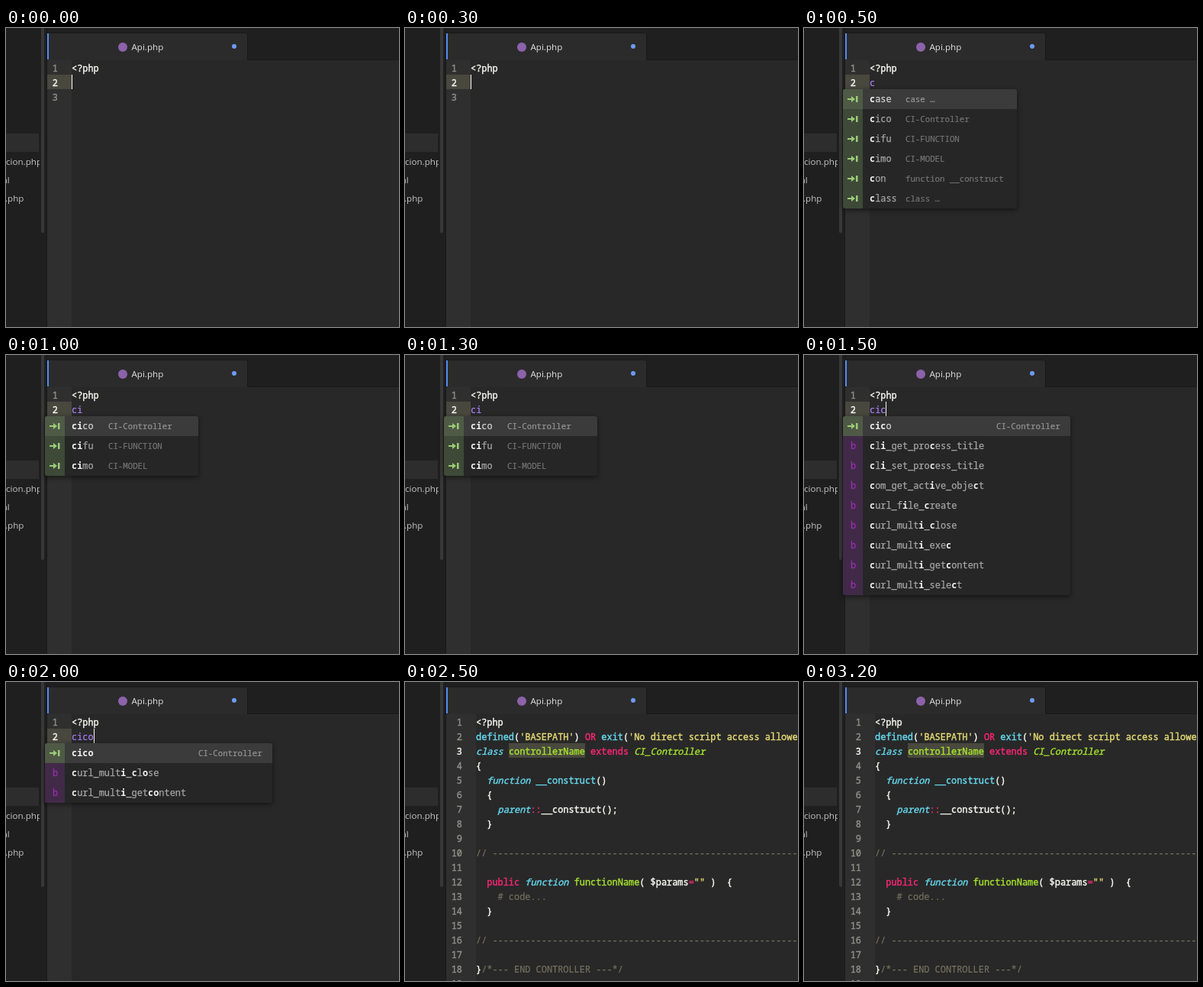
An HTML page for the animation above (3.67 s loop, 515 px wide and 391 px high).

```html
<!DOCTYPE html>
<html lang="en">
<head>
<meta charset="utf-8">
<title>Snippet completion</title>
<style>
html, body { margin: 0; width: 100%; height: 100%; overflow: hidden; background: #282828; }
svg { display: block; }
text { white-space: pre; }
.ui { font: 11.6px "Open Sans", "Noto Sans", sans-serif; fill: #c4c4c4; }
.tab { fill: #e2e2e2; }
.code {
  font: 500 11.915px "Noto Sans Mono", "DejaVu Sans Mono", monospace;
  color: #f8f8f2; fill: currentColor; stroke: currentColor; stroke-width: .4px;
}
.item { color: #a6a6a6; stroke-width: .25px; }
.hit { font-weight: 700; color: #f0f0f0; stroke-width: 0; }
.label { font-size: 10.72px; color: #757575; stroke-width: .2px; }
.item.on { color: #d0d0d0; }
.label.on { color: #969696; }
.num { color: #90908a; text-anchor: end; }
.cur { color: #f8f8f2; }
.k { color: #66d9ef; font-style: italic; }
.f { color: #66d9ef; }
.r { color: #f92672; }
.g { color: #a6e22e; }
.i { color: #a6e22e; font-style: italic; }
.s { color: #e6db74; }
.c { color: #75715e; stroke-width: .2px; }
.v { color: #ae81ff; stroke-width: .2px; }
.b { color: #962fae; stroke-width: .3px; }
.popup { filter: drop-shadow(0 2px 3px #0008); }
</style>
</head>
<body>
<svg id="stage" width="515" height="391" viewBox="0 0 515 391"></svg>
<script>
const LINE = 19, TOP = 42, ROW = 26, CHAR = 7.149;
const rect = (x, y, w, h, fill, more = '') =>
  `<rect x="${x}" y="${y}" width="${w}" height="${h}" fill="${fill}" ${more}/>`;
const text = (x, y, cls, body) => `<text x="${x}" y="${y}" class="${cls}">${body}</text>`;
const span = (cls, s) => `<tspan class="${cls}">${s.replace(/</g, '&lt;')}</tspan>`;
const baseline = n => TOP + LINE * n - 4;

const frame = rect(0, 0, 515, 391, '#282828') +
  rect(0, 0, 515, 42, '#1f1f1f') + rect(0, 0, 53, 391, '#1f1f1f') +
  rect(53, 0, 1, 391, '#191919') + rect(317, 41, 198, 1, '#181818') +
  rect(0, 138, 43, 24, '#2d2d2d') + rect(46, -4, 4, 272, '#383838', 'rx="2"') +
  '<clipPath id="side"><path d="M0 0H44V391H0z"/></clipPath><g clip-path="url(#side)">' +
  text(0, 179, 'ui', 'cion.php') + text(-9, 203, 'ui', 'ml') + text(-1, 227, 'ui', '.php') + '</g>' +
  '<path d="M54 42V9q0-3 3-3H313q3 0 3 3V42" fill="#2b2b2b"/>' +
  '<path d="M54.5 8.5q0-2 3-2H313.5q3 0 3 3V42" fill="none" stroke="#191919"/>' +
  rect(54, 7, 2, 34, '#568af2') +
  '<circle cx="153" cy="25" r="6" fill="#8c62aa"/><circle cx="299" cy="24" r="3" fill="#6c9bf5"/>' +
  text(164.5, 29, 'ui tab', 'Api.php');

function gutter(count, active, left) {
  let out = rect(54, TOP, left - 54, 349, '#2f2f2f');
  if (count === 3) out += rect(54, 61, left - 54, LINE, '#49483e');
  for (let n = 1; n <= count; n++)
    out += text(left - 18, baseline(n), n === active ? 'code num cur' : 'code num', n);
  return out;
}

// Highlight the typed letters in order inside a suggestion.
function match(word, typed) {
  let at = 0;
  return [...word].map(ch => ch === typed[at] ? (at++, span('hit', ch)) : ch).join('');
}

function popup(typed, width, labelX, items) {
  const rows = items.map(([word, label], i) => {
    const y = 80 + ROW * i, mid = y + 13, on = i === 0 ? ' on' : '';
    const side = label ? (on ? '#4e5a46' : '#3e4938') : '#412a47';
    const icon = label
      ? `<path transform="translate(57 ${mid})" fill="#9ccb76" d="M0-1H5V-4L10 0 5 4V1H0zM11-4h2.5v8H11z"/>`
      : text(61, mid + 4, 'code b', 'b');
    return rect(51, y, width, ROW, on ? '#3b3b3b' : '#262626') + rect(51, y, 26, ROW, side) + icon +
      text(86, mid + 4, 'code item' + on, match(word, typed)) +
      (label ? text(labelX, mid + 4, 'code label' + on, label) : '');
  }).join('');
  const id = 'clip' + typed;
  return `<clipPath id="${id}">${rect(51, 80, width, ROW * items.length, '#000', 'rx="3"')}</clipPath>` +
    `<g class="popup"><g clip-path="url(#${id})">${rows}</g></g>`;
}

function typing(typed, caret, list = '') {
  return gutter(3, 2, 86) + text(86, baseline(1), 'code', '&lt;?php') +
    text(86, baseline(2), 'code v', typed) +
    (caret ? rect(Math.round(86 + typed.length * CHAR), 61, 1, LINE, '#f8f8f0') : '') + list;
}

const rule = [['c', '// ' + '-'.repeat(60)]];
const program = [
  [['', '<?php']],
  [['f', 'defined'], ['', '('], ['s', "'BASEPATH'"], ['', ') '], ['r', 'OR'], ['f', ' exit'], ['', '('],
    ['s', "'No direct script access allowed'"], ['', ');']],
  [['k', 'class '], ['g', 'controllerName'], ['r', ' extends '], ['i', 'CI_Controller']],
  [['', '{']],
  [['k', '  function '], ['f', '__construct'], ['', '()']],
  [['', '  {']],
  [['k', '    parent'], ['r', '::'], ['', '__construct();']],
  [['', '  }']],
  [],
  rule,
  [],
  [['r', '  public '], ['k', 'function '], ['g', 'functionName'], ['', '( $params'], ['r', '='],
    ['s', '""'], ['', ' )  {']],
  [['c', '    # code...']],
  [['', '  }']],
  [],
  rule,
  [],
  [['', '}'], ['c', '/*--- END CONTROLLER ---*/']],
  []
];
const expanded = gutter(program.length, 3, 93) + rect(136, 80, 100, LINE, '#49483e') +
  program.map((line, i) =>
    text(93, baseline(i + 1), 'code', line.map(([cls, s]) => span(cls, s)).join(''))).join('');

const snippets = [['cico', 'CI-Controller'], ['cifu', 'CI-FUNCTION'], ['cimo', 'CI-MODEL']];
const plain = names => names.split(' ').map(name => [name]);
const scenes = [
  typing('', true),
  typing('c', false, popup('c', 228, 133, [['case', 'case …'], ...snippets,
    ['con', 'function __construct'], ['class', 'class …']])),
  typing('ci', false, popup('ci', 201, 134, snippets)),
  typing('cic', true, popup('cic', 298, 252, [snippets[0], ...plain(
    'cli_get_process_title cli_set_process_title com_get_active_object curl_file_create ' +
    'curl_multi_close curl_multi_exec curl_multi_getcontent curl_multi_select')])),
  typing('cico', true, popup('cico', 298, 252, [snippets[0],
    ...plain('curl_multi_close curl_multi_getcontent')])),
  expanded
];

const stage = document.getElementById('stage');
stage.innerHTML = frame + scenes.map(s => `<g class="scene">${s}</g>`).join('');
const groups = stage.querySelectorAll('.scene');
const start = performance.now();

function draw(now) {
  const t = Math.max(0, now - start) % 3670;
  const step = Math.min(5, Math.floor(t / 500));
  groups.forEach((g, i) => { g.style.display = i === step ? '' : 'none'; });
  requestAnimationFrame(draw);
}
draw(start);
</script>
</body>
</html>
```
